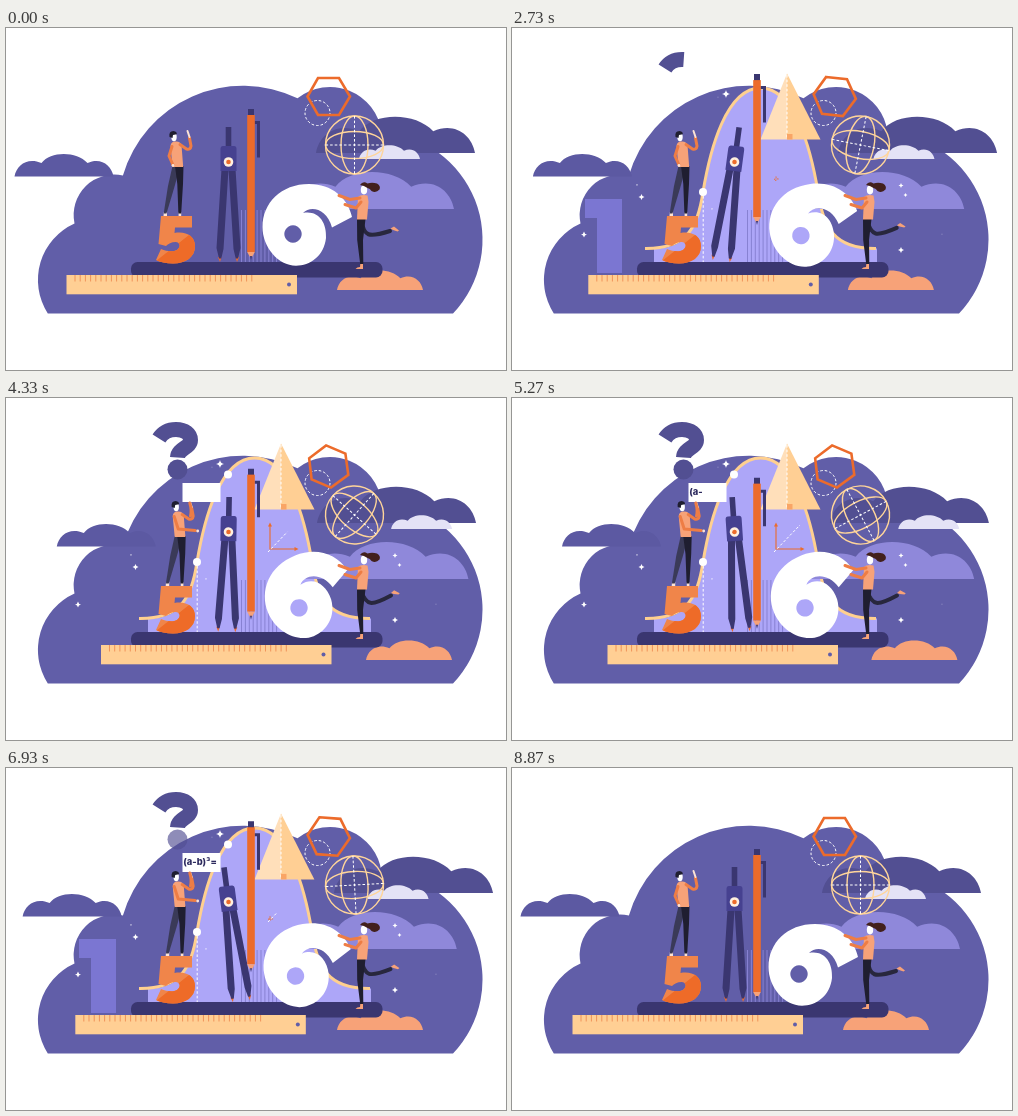
An HTML page for the animation above (9.01 s loop, 500 by 342 pixels).

```html
<!DOCTYPE html>
<html lang="en">
<head>
<meta charset="utf-8">
<title>Maths scene</title>
<style>
  html, body { margin: 0; width: 100%; height: 100%; overflow: hidden; background: #fff; }
  svg { display: block; width: 100%; height: 100%; }
  .ink { fill: #3a3670; }
  .orange { fill: #ec6b2b; }
  .sand { fill: #ffcf94; }
  .skin { fill: #f7a278; }
  .dark { fill: #1f1e30; }
  .dash { fill: none; stroke: #fff; stroke-width: 1; stroke-dasharray: 2.6 2; }
  .wire { fill: none; stroke: #ffd59a; stroke-width: 1.4; }
  .arm { fill: none; stroke: #ee7d45; stroke-width: 3; stroke-linecap: round; stroke-linejoin: round; }
  .axis { fill: none; stroke: #ec6b2b; stroke-width: 1.1; }
  .note { font: 800 9.3px Inter, "Open Sans", sans-serif; fill: #2d2a5e; }
</style>
</head>
<body>
<svg viewBox="0 0 500 342" preserveAspectRatio="none">
  <defs>
    <path id="five" d="M155 188H186V199.5H169L168.5 205C180 203 189 208 189 218C189 229 180 235.5 167 235.5C160 235.5 154 234 150 232L155 221C161 223.5 167 224 171 222C175 219 174.5 214.5 169.5 214C165.5 214 162 216 160 218L152.5 216Z"/>
    <clipPath id="fiveClip"><use href="#five"/></clipPath>
  </defs>

  <path fill="#615ea8" d="M41.8 285.5A62 62 0 0 1 68.5 195.4A40.5 40.5 0 0 1 116.9 147.5A125 125 0 0 1 291.5 70.3A52 52 0 0 1 375.5 104.2A107.5 107.5 0 0 1 447 285.5Z"/>

  <g id="clouds"></g>
  <path id="one" fill="#7b76d2" d="M73 171H110V245H85V190H73Z"/>

  <g id="bell">
    <path fill="#ada6f8" d="M142 220.5C176 221 186 198 191 164C198 122 214 60 248.5 60C283 60 299 122 306 164C311 198 321 221 365 220.5V234H142Z"/>
    <path fill="none" stroke="#ffd08f" stroke-width="3" d="M133 220.5C176 221 186 198 191 164C198 122 214 60 248.5 60C283 60 299 122 306 164C311 198 321 221 364 220.5"/>
    <path class="dash" d="M191.2 168V234"/>
  </g>
  <circle id="dotLow" cx="191" cy="164" r="4" fill="#fff"/>
  <circle id="dotHigh" cx="222" cy="76.5" r="4" fill="#fff"/>
  <g id="frontClouds"></g>

  <g id="pyramid">
    <path fill="#ffdfba" d="M275 45.5V111.5H248.5Z"/>
    <path class="sand" d="M275 45.5L308.5 111.5H275Z"/>
    <path class="dash" d="M275 47V111"/>
    <rect x="275" y="106" width="5.5" height="5.5" fill="#f9a566"/>
  </g>

  <g id="plot">
    <path id="axes" class="axis"/>
    <path id="heads" class="orange"/>
    <path id="diagonal" class="dash"/>
  </g>

  <path id="hook" fill="none" stroke="#524f92" stroke-width="15" pathLength="1"
    d="M153 40.5C157 34 163 31.5 170 31.5C179 31.5 184.5 36 184.5 42C184.5 50 172 50 171.5 59.5"/>
  <circle id="hookDot" cx="171.5" cy="71.5" r="10" fill="#524f92"/>

  <circle class="dash" cx="311.5" cy="85" r="12.5"/>
  <path id="hexagon" fill="none" stroke="#ec6b2b" stroke-width="2.6" d="M312 50H333L344 68.5L333 87H312L301.5 68.5Z"/>
  <g id="globe">
    <circle class="wire" cx="348.5" cy="117" r="29"/>
    <ellipse class="wire" cx="348.5" cy="117" rx="13.5" ry="29"/>
    <ellipse class="wire" cx="348.5" cy="117" rx="29" ry="13.5"/>
    <path class="dash" d="M348.5 88V146M319.5 117H377.5"/>
  </g>
  <g id="stars" fill="#fff"></g>

  <path id="hatch" stroke="#8781d2" stroke-width="1"/>
  <rect class="ink" x="125" y="234" width="251.5" height="15.5" rx="6.5"/>

  <g id="compass">
    <path class="orange" d="M212 229H215.5L214 234ZM229.5 229H233L231 234Z"/>
    <path class="ink" d="M219.7 99H225.3V120H219.7Z M215.5 141H222.5L217.5 221L215.3 230.5H213L210.5 220Z M222.5 141H229.5L234.5 220L232 230.5H229.7L227.5 221Z"/>
    <path fill="#464190" d="M217 118H228Q230.5 118 230.5 121V143H214.5V121Q214.5 118 217 118Z"/>
    <circle cx="222.5" cy="134" r="4.8" fill="#fff0df"/>
    <circle class="orange" cx="222.5" cy="134" r="2.3"/>
  </g>

  <g id="pencil">
    <path class="ink" d="M242 81H248V88H242Z M248.5 93H254V129.5H251V96H248.5Z"/>
    <rect class="orange" x="241.2" y="87" width="7.6" height="137"/>
    <path fill="#f7a278" d="M241.2 224H248.8L246 229H244Z"/>
    <path class="ink" d="M244 228H246L245 232Z"/>
  </g>

  <use href="#five" fill="#f0854a"/>
  <path clip-path="url(#fiveClip)" fill="#ee6b28" d="M192 200L150 233V240H192Z"/>

  <g id="ruler">
    <rect class="sand" x="60.5" y="247" width="230.5" height="19.3"/>
    <path id="ticks" stroke="#f0935a" stroke-width="1"/>
    <circle cx="283" cy="256.5" r="2" fill="#615ea8"/>
  </g>

  <path id="six" fill="#fff" fill-rule="evenodd"
    d="M346 189L326 199.5C321 181 305 177 297 185C312 182 321 194 320 210C318 228 304 237.7 290 237.7C272 237.7 256.5 219 256.5 199C256.5 175 275 156 303 156C326 156 342 170 346 189Z
       M287 197.3a8.7 8.7 0 1 0 .01 0Z"/>

  <g id="man">
    <path fill="#fbe3d6" d="M157.8 184H161V188H157.5ZM172.6 184H175.2V188H172.6Z"/>
    <path fill="#3a3a58" d="M166.5 138H174L169 157L160.5 185.5H157.7L162 158Z"/>
    <path class="dark" d="M169 138H177.5L177 156L175.2 185.5H172.4L171.3 156Z"/>
    <path class="skin" d="M164.5 118Q165 113.5 169 113.5Q174.5 113 175.5 117L177.2 139H166.5Z"/>
    <path class="arm" d="M174 116.5L180.5 121Q184.5 122 185 118L183.5 110"/>
    <path d="M183.5 109L181.5 103" stroke="#fbe3d6" stroke-width="2" stroke-linecap="round"/>
    <path id="reach" class="arm"/>
    <circle id="palm" r="1.4" fill="#fbe3d6"/>
    <ellipse cx="168" cy="109" rx="2.7" ry="4.2" fill="#fff"/>
    <path class="dark" d="M163.5 109Q162.5 103 167.5 103Q171 103.5 170.8 106.3L167 107L166.5 110Z"/>
  </g>

  <g id="woman">
    <g id="backLeg">
      <path d="M355.5 193C358 208 362 210 384 203" fill="none" stroke="#28273d" stroke-width="4" stroke-linecap="round"/>
      <path class="skin" d="M384.5 200.5L388 198.5L393 202.5L391.5 203.5L387 202Z"/>
    </g>
    <path class="dark" d="M351 191H359.5L357 212L357.3 236H354.2L351.2 212Z"/>
    <path class="skin" d="M354.3 236H357V241H349.5Q351 239 354 239Z"/>
    <path class="skin" d="M352 169Q355 166 361.5 167.5L362.5 174L361 191.5H351Z"/>
    <path class="arm" d="M354 170L344 171.5L333 167.5M355 174L350 180L339 176.5"/>
    <ellipse cx="358" cy="161.8" rx="3.2" ry="4.6" fill="#fff"/>
    <path fill="#42201c" d="M354 157Q357 152.5 361.5 155.5Q366 154 371 155.5Q375 158 373.5 161.5Q370 165.5 365.5 163Q364 160.5 361.5 160Q358 157.5 354 157Z"/>
  </g>

  <g id="board">
    <rect x="176.5" y="85" width="38" height="19" fill="#fff"/>
    <text id="formula" class="note" x="177.3" y="97.3"></text>
  </g>
  <path id="holdArm" class="arm" d="M183.8 105Q186 112 184.5 118"/>
</svg>

<script>
const LOOP = 9010;
const FORMULA = "(a-b)³=";
const $ = id => document.getElementById(id);
const set = (id, name, value) => $(id).setAttribute(name, value);
const add = (parent, tag, attrs) => {
  const el = document.createElementNS("http://www.w3.org/2000/svg", tag);
  for (const k in attrs) el.setAttribute(k, attrs[k]);
  return $(parent).appendChild(el);
};
const mix = (a, b, k) => a + (b - a) * k;
const scaleAt = (id, x, y, sx, sy = sx) =>
  set(id, "transform", `translate(${x} ${y}) scale(${sx} ${sy}) translate(${-x} ${-y})`);
const turn = (id, x, y, deg) => set(id, "transform", `rotate(${deg} ${x} ${y})`);
const shift = (id, x, y) => set(id, "transform", `translate(${x} ${y})`);

// Sine easing from 0 to 1 between two times; swing goes there and back.
const ramp = (t, from, to) =>
  (1 - Math.cos(Math.PI * Math.min(1, Math.max(0, (t - from) / (to - from))))) / 2;
const swing = (t, a, b, c, d) => ramp(t, a, b) - ramp(t, c, d);

const drift = t => swing(t, 1750, 4450, 5010, 7710);
const skyX = t => 19 * (swing(t, 130, 2050, 2050, 4700) + swing(t, 4200, 6600, 6600, 8870));

// Clouds share one outline, scaled to the wanted width.
const PUFF = "M0 22.5C2 11 13 3 27 9C36 -3 62 -3 73 9C86 3 97 11 99 22.5Z";
const clouds = [
  ["clouds", 8.5, 148.5, 99, "#5c59a2", t => 42.5 * drift(t)],
  ["clouds", 310, 125, 159, "#524f92", skyX],
  ["clouds", 353, 131, 61, "#e4e2f6", t => 34 * swing(t, 1700, 4800, 5000, 7900)],
  ["frontClouds", 285, 181, 163, "#8f88da", t => 14.5 * drift(t)],
  ["frontClouds", 331, 262, 86, "#f7a278", t => 29 * swing(t, 2300, 3900, 5100, 6950)]
].map(([layer, x, bottom, width, fill, dx]) => {
  const k = width / 99;
  return { el: add(layer, "path", { d: PUFF, fill }), x, y: bottom - 22.5 * k, k, dx };
});

// Steady stars dim while the others flash.
const SPARK = "M0-1Q.14-.14 1 0Q.14.14 0 1Q-.14.14-1 0Q-.14-.14 0-1Z";
const steady = blink => 1 - .85 * blink;
const flash = blink => .2 + .8 * blink;
const stars = [
  [214, 66, 4, steady], [129.5, 169, 3, steady], [72, 206.5, 3, steady], [389, 222, 3, steady],
  [125, 157, 4.5, flash], [200, 181, 4.5, flash], [206, 69, 3, flash], [430, 206, 3, flash],
  [389, 157.5, 2.5, () => 1], [393.5, 167, 2, () => 1]
].map(([x, y, r, beat]) => ({ el: add("stars", "path", { d: SPARK }), x, y, r, beat }));

const bars = (n, x, step, y, h) => Array.from({ length: n }, (_, i) => `M${x + i * step} ${y}v${h}`).join("");
set("ticks", "d", bars(35, 69, 5.2, 247, 6.5));
set("hatch", "d", bars(10, 235.5, 3.9, 182, 52));

function drawSky(t) {
  for (const c of clouds)
    c.el.setAttribute("transform", `translate(${c.x + c.dx(t)} ${c.y}) scale(${c.k})`);
  const shown = swing(t, 1700, 2400, 7600, 8300), blink = swing(t, 2950, 3500, 3550, 4200);
  for (const s of stars)
    s.el.setAttribute("transform", `translate(${s.x} ${s.y}) scale(${s.r * shown * s.beat(blink)})`);
}

function drawTools(t) {
  turn("hexagon", 322.5, 68.5, 23 * swing(t, 2200, 3700, 5500, 7500));
  turn("globe", 348.5, 117, 90 * ramp(t, 1250, 7700));
  turn("compass", 222.5, 134, 7.8 * swing(t, 130, 2500, 2500, 4900) - 9 * swing(t, 4400, 6330, 6330, 8500));
  turn("six", 300, 192.5, -22 * swing(t, 1700, 4300, 5600, 8100));
  shift("pencil", 0, -35 * (swing(t, 700, 2800, 3000, 5100) + swing(t, 5100, 6450, 6450, 8050)));
  shift("ruler", 35 * swing(t, 1080, 4600, 5800, 7500), 0);
}

function drawGraph(t) {
  set("bell", "opacity", swing(t, 1070, 2000, 7350, 8400));
  scaleAt("dotLow", 191, 164, swing(t, 1900, 2500, 7700, 8300));
  scaleAt("dotHigh", 222, 76.5, swing(t, 2800, 3400, 7700, 8300));
  scaleAt("pyramid", 275, 78, swing(t, 1700, 2600, 6900, 7750));
  scaleAt("one", 95, 208, swing(t, 300, 1500, 2800, 3450) + swing(t, 5500, 6150, 7600, 8600));

  const a = swing(t, 2600, 4000, 5600, 7100), tipX = 264 + 26 * a, tipY = 151 - 24 * a;
  set("plot", "visibility", a > 0 ? "visible" : "hidden");
  set("axes", "d", `M264 ${tipY}V151H${tipX}`);
  set("heads", "d", `M264 ${tipY - 2.5}l2 4h-4ZM${tipX + 2.5} 151l-4 -2v4Z`);
  const k = swing(t, 3800, 4600, 6500, 7200);
  set("diagonal", "d", `M262 154L${mix(262, 288, k)} ${mix(154, 127, k)}`);
  set("diagonal", "opacity", k > 0 ? 1 : 0);
}

function drawPeople(t) {
  turn("backLeg", 356, 195, -11 * swing(t, 1700, 3600, 5300, 8000));
  const r = swing(t, 2800, 3450, 7700, 8500), handX = mix(167, 187, r), handY = mix(137, 132.5, r);
  shift("man", 2.2 * r, 0);
  set("reach", "d", `M166 118.5L${mix(163, 170, r)} ${mix(128, 131, r)}L${handX} ${handY}`);
  set("palm", "cx", handX + 2.5 * r);
  set("palm", "cy", handY + .5);
}

function drawQuestion(t) {
  const hook = swing(t, 2350, 3300, 6950, 7950);
  set("hook", "stroke-dasharray", `${hook} 2`);
  set("hook", "visibility", hook > 0 ? "visible" : "hidden");
  set("hookDot", "opacity", swing(t, 3250, 3650, 6750, 7200));

  const open = swing(t, 3480, 3900, 7650, 8200);
  scaleAt("board", 176.5, 85.5, 1, open);
  set("holdArm", "opacity", open > .1 ? 1 : 0);
  $("formula").textContent = FORMULA.slice(0, Math.max(0, Math.floor((t - 4000) / 350)));
}

function frame() {
  const t = performance.now() % LOOP;
  for (const part of [drawSky, drawTools, drawGraph, drawPeople, drawQuestion]) part(t);
  requestAnimationFrame(frame);
}
frame();
</script>
</body>
</html>
```
